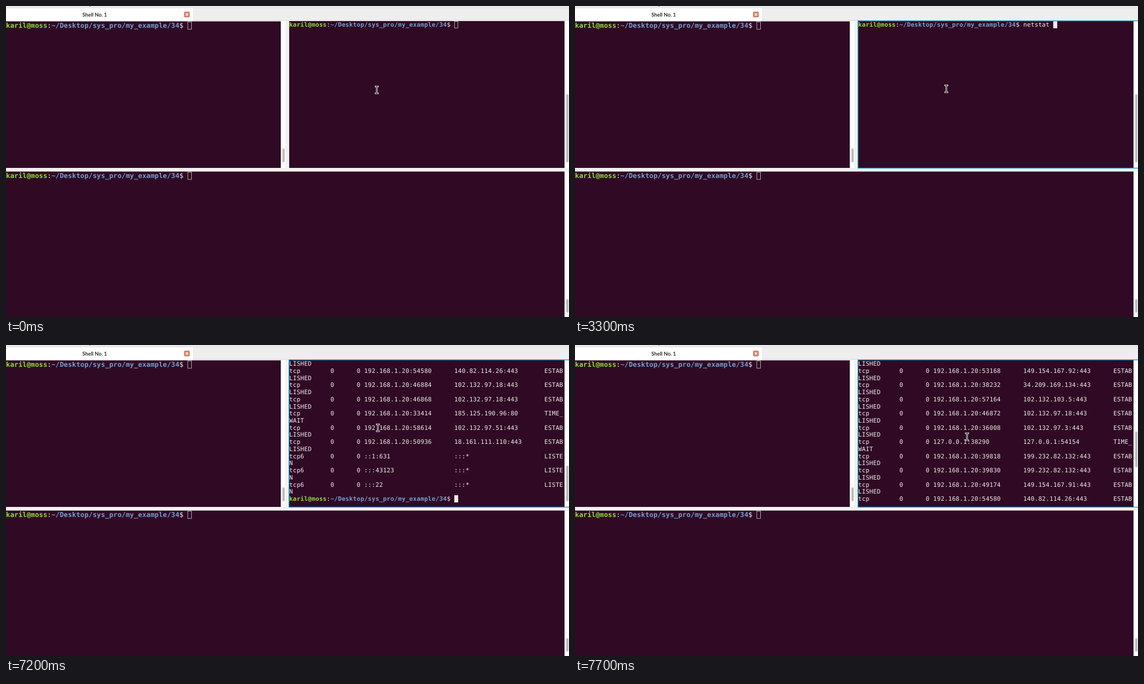
These frames come from a looping animation (1006x557 px, 8 s). An HTML page:

```html
<!DOCTYPE html>
<html lang="en">
<head>
<meta charset="utf-8">
<title>Terminal session</title>
<style>
html, body { margin: 0; width: 100%; height: 100%; overflow: hidden; background: #f2f1f0; }
#stage { position: relative; width: 1006px; height: 557px; overflow: hidden; }
#stage div, svg { position: absolute; }

/* window chrome */
.title { left: 0; top: 0; width: 1006px; height: 3px; background: #ebebeb; }
.edge { left: 0; top: 3px; width: 1006px; height: 1px; background: #dedede; }
.speck { left: 149px; top: 0; width: 2px; height: 1px; background: #777; }
.tabs { left: 0; top: 4px; width: 1006px; height: 21px; background: #efeeee; }
.line { left: 334px; top: 25px; width: 672px; height: 1px; background: #dcdbda; }
.tab { left: 0; top: 4px; width: 334px; height: 23px; background: #fff; }
.name { left: 58.5px; top: 9px; width: 200px; text-align: center;
  font: 700 9.2px/13px Lato, "Open Sans", sans-serif; color: #2b2b2b; }

/* panes */
.pane { overflow: hidden; }
.track { background: #fff; width: 8px; }
.thumb { width: 4px; border-radius: 2px; background: #bebdbc; }

/* terminal cells, drawn at full size and scaled to the stage */
.term { --w: 10px; --h: 19px; transform: scale(.6706); transform-origin: 0 0;
  font: 16px/var(--h) "DejaVu Sans Mono", monospace; letter-spacing: calc(var(--w) - 1ch);
  white-space: pre; color: #eeeeec; text-rendering: geometricPrecision; font-variant-ligatures: none; }
.big { --w: 11px; --h: 21px; font-size: 18px; }
.user { color: #8ae234; font-weight: 700; }
.path { color: #729fcf; font-weight: 700; }
.cell { display: inline-block; box-sizing: border-box; vertical-align: top;
  width: var(--w); height: var(--h); border: 1.5px solid #eeeeec; }
.full { background: #eeeeec; }
.typed { display: inline-block; vertical-align: top; overflow: hidden; height: var(--h); }
#input, #output { left: 0; top: 0; }

/* timeline */
.run { animation: 8s step-end infinite; }
.typed { animation-name: type; }
#caret { animation-name: fill; }
#ring { animation-name: focus; }
#input { animation-name: leave; }
#output { animation-name: scroll; }
#bar { animation-name: bar; }
#mouse { animation-name: mouse; }

@keyframes type {
  0% { width: 0; } 18.75% { width: 10px; } 20% { width: 20px; } 22.5% { width: 30px; }
  37.5% { width: 40px; } 40% { width: 60px; } 41.25% { width: 80px; }
  56.25% { width: 90px; } 57.5% { width: 100px; } 61.25% { width: 110px; } 67.5% { width: 120px; }
}
@keyframes fill { 0% { background: transparent; } 6.25% { background: #eeeeec; } }
@keyframes focus { 0% { opacity: 0; } 6.25% { opacity: 1; } }
@keyframes leave { 0% { opacity: 1; } 70% { opacity: 0; } }
/* rows of history hidden above the pane: 18, 9, 6, 3, 0 */
@keyframes scroll {
  0% { opacity: 0; top: -342px; } 70% { opacity: 1; top: -342px; }
  91.25% { opacity: 1; top: -171px; } 92.5% { opacity: 1; top: -114px; }
  93.75% { opacity: 1; top: -57px; } 96.25% { opacity: 1; top: 0; }
}
@keyframes bar {
  0% { top: 158px; height: 122px; } 70% { top: 216px; height: 64px; }
  91.25% { top: 185px; height: 64px; } 92.5% { top: 175px; height: 64px; }
  93.75% { top: 165px; height: 64px; } 96.25% { top: 155px; height: 64px; }
}
@keyframes mouse {
  0% { left: 654px; top: 140px; } 8.75% { left: 655px; top: 139px; }
  10% { left: 655px; top: 138px; } 90% { left: 656px; top: 138px; }
  91.25% { left: 666px; top: 140px; } 92.5% { left: 673px; top: 144px; }
  93.75% { left: 679px; top: 147px; } 95% { left: 686px; top: 151px; }
  96.25% { left: 692px; top: 154px; }
}
</style>
</head>
<body>
<div id="stage">
  <div class="title"></div><div class="edge"></div><div class="speck"></div>
  <div class="tabs"></div><div class="line"></div><div class="tab"></div>
  <div class="name">Shell No. 1</div>
  <svg style="left:318px;top:10px" width="11" height="11">
    <rect x=".3" y=".3" width="9.8" height="9.8" rx="1.8" fill="#d98065" stroke="#cb7a60" stroke-width=".6"/>
    <path d="M3.3 3.3l4 4m0-4l-4 4" stroke="#fff" stroke-width="1.4"/>
  </svg>

  <svg style="left:0;top:0" width="1006" height="557" fill="#300a24">
    <rect y="27.5" width="491" height="262.5"/>
    <rect x="506" y="27" width="492" height="263"/>
    <rect y="296.5" width="998" height="260.5"/>
  </svg>

  <div class="pane" style="left:0;top:27px;width:491px;height:263px">
    <div class="term big" style="left:-.4px;top:1px"><span class="prompt"></span><span class="cell"></span></div>
  </div>
  <div class="track" style="left:491px;top:27px;height:263px"></div>
  <div class="thumb" style="left:493.5px;top:255px;height:25px"></div>

  <div class="pane" style="left:506px;top:27px;width:492px;height:256px">
    <div class="term" style="left:.2px;top:.3px">
      <div id="input" class="run"><span class="prompt"></span><span class="typed run">netstat -ant</span><span id="caret" class="cell run"></span></div>
      <div id="output" class="run"><span id="rows"></span><span class="prompt"></span><span class="cell full"></span></div>
    </div>
  </div>
  <div class="track" style="left:998px;top:27px;height:263px"></div>
  <div id="bar" class="thumb run" style="left:1001px"></div>

  <div class="pane" style="left:0;top:296px;width:998px;height:261px">
    <div class="term big" style="left:-.4px;top:1.1px"><span class="prompt"></span><span class="cell"></span></div>
  </div>
  <div class="track" style="left:998px;top:297px;height:260px"></div>
  <div class="thumb" style="left:1001px;top:525px;height:24px"></div>

  <svg id="ring" class="run" style="left:0;top:0" width="1006" height="300">
    <rect x="505.67" y="26.67" width="510" height="263.7" fill="none" stroke="#149fd0" stroke-width="1.34"/>
  </svg>
  <svg id="mouse" class="run" width="18" height="20" fill="none" stroke-linecap="square">
    <path d="M6.4 4.1H10.6M8.5 4.1V16.5M6.4 16.5H10.6" stroke="#f4f4f4" stroke-width="2.6"/>
    <path d="M6.4 4.1H10.6M8.5 4.1V16.5M6.4 16.5H10.6" stroke="#111" stroke-width=".9"/>
  </svg>
</div>
<script>
const COLS = 73, LAN = '192.168.1.20:';
const prompt = '<span class="user">karil@moss</span>:<span class="path">~/Desktop/sys_pro/my_example/34</span>$ ';
for (const el of document.querySelectorAll('.prompt')) el.innerHTML = prompt;

const E = 'ESTABLISHED', T = 'TIME_WAIT';
const row = (proto, local, remote, state) => {
  const text = proto.padEnd(11) + '0'.padEnd(7) + '0 ' + local.padEnd(24) + remote.padEnd(24) + state;
  return text.slice(0, COLS) + '\n' + text.slice(COLS) + '\n';
};
const tcp = (port, remote, state = E) => row('tcp', LAN + port, remote, state);
const listen = local => row('tcp6', local, ':::*', 'LISTEN');

document.getElementById('rows').textContent = 'LISHED\n' + [
  tcp('53168', '149.154.167.92:443'),
  tcp('38232', '34.209.169.134:443'),
  tcp('57164', '102.132.103.5:443'),
  tcp('46872', '102.132.97.18:443'),
  tcp('36008', '102.132.97.3:443'),
  row('tcp', '127.0.0.1:38290', '127.0.0.1:54154', T),
  tcp('39818', '199.232.82.132:443'),
  tcp('39830', '199.232.82.132:443'),
  tcp('49174', '149.154.167.91:443'),
  tcp('54580', '140.82.114.26:443'),
  tcp('46884', '102.132.97.18:443'),
  tcp('46868', '102.132.97.18:443'),
  tcp('33414', '185.125.190.96:80', T),
  tcp('58614', '102.132.97.51:443'),
  tcp('50936', '18.161.111.110:443'),
  listen('::1:631'),
  listen(':::43123'),
  listen(':::22')
].join('');
</script>
</body>
</html>
```
